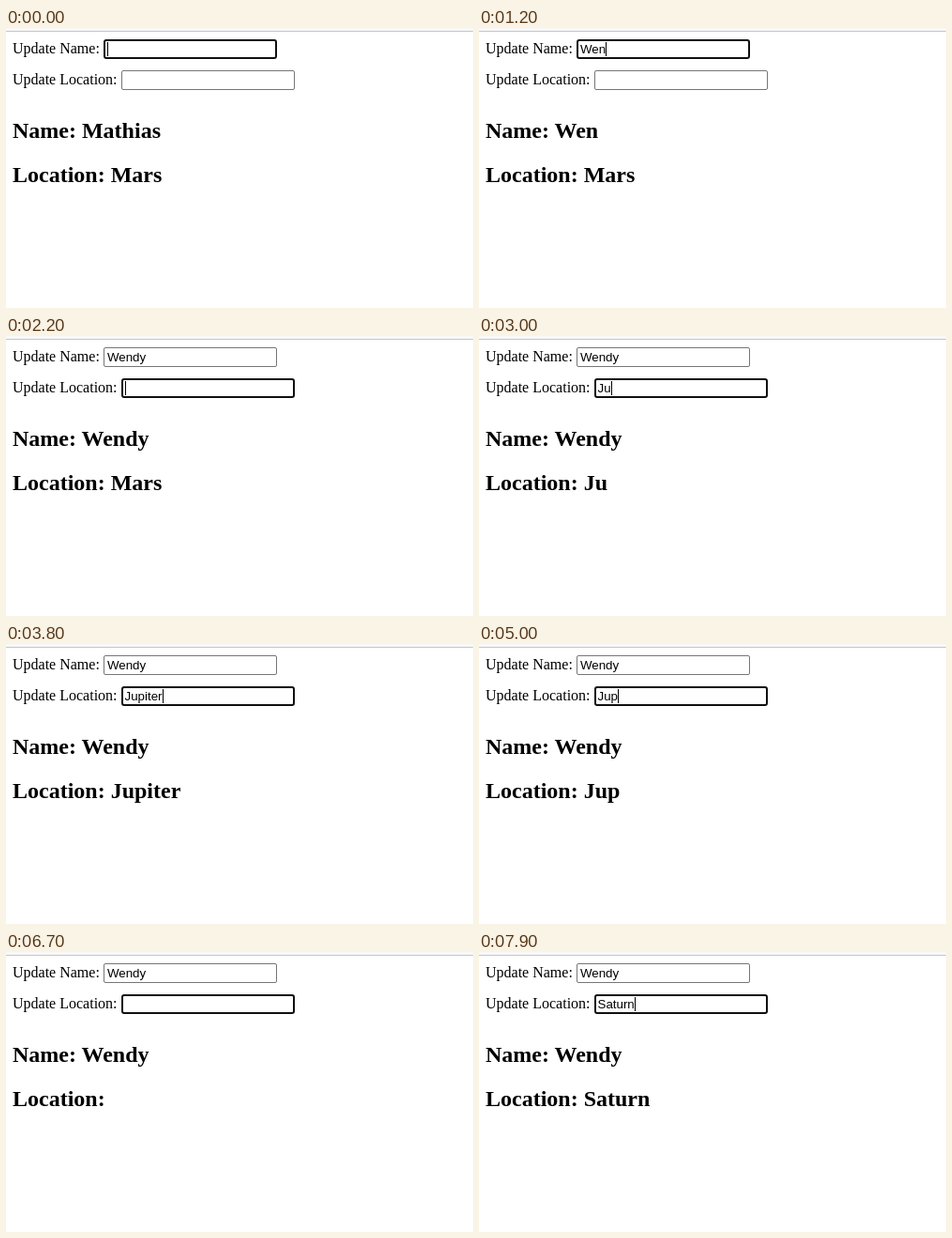
Recreate the animation shown at these times as an HTML page. Size 498 by 298 pixels, loop 8 s.

```html
<!DOCTYPE html>
<html lang="en">
<head>
<meta charset="utf-8">
<title>Update form</title>
<style>
  html, body { margin: 0; width: 100%; height: 100%; overflow: hidden; background: #fff; }
  svg { display: block; }
  .label { font: 16px "Liberation Serif", "Times New Roman", serif; }
  .head { font: bold 24px "Liberation Serif", "Times New Roman", serif; }
  .value { font: 13.3333px "Liberation Sans", Arial, sans-serif; }
  .box { fill: #fff; stroke: #767676; stroke-width: 1; }
  .box.focus { stroke: #101010; stroke-width: 2; }
</style>
</head>
<body>
<svg width="498" height="298" viewBox="0 0 498 298">
  <rect width="498" height="298" fill="#fff"/>
  <rect width="498" height="3" fill="#f8f8f8"/>
  <rect y="3" width="498" height="1" fill="#c6c6c6"/>
  <text class="label" x="7" y="27">Update Name:</text>
  <text class="label" x="7" y="60">Update Location:</text>
  <rect id="nameBox" class="box"/>
  <rect id="placeBox" class="box"/>
  <text id="nameValue" class="value" x="107.9" y="27"></text>
  <text id="placeValue" class="value" x="126.5" y="60"></text>
  <rect id="caret" width="1" height="15"/>
  <text id="nameHead" class="head" x="7" y="117"></text>
  <text id="placeHead" class="head" x="7" y="164"></text>
</svg>
<script>
const LOOP = 8000;
const FOCUS_MOVE = 2200;
const get = id => document.getElementById(id);

const makeField = (id, x, y, textX) => ({
  x, y, textX,
  box: get(id + "Box"),
  value: get(id + "Value"),
  head: get(id + "Head")
});
const nameField = makeField("name", 104, 12, 107.9);
const placeField = makeField("place", 123, 45, 126.5);
const caret = get("caret");

// One key press per time; count is the number of letters left after it.
const press = (word, times, from = 0, step = 1) =>
  times.map((at, i) => ({ at, text: word.slice(0, from + step * (i + 1)) }));

const nameKeys = press("Wendy", [1000, 1100, 1200, 1300, 1700]);
const placeKeys = [
  ...press("Jupiter", [2900, 3000, 3300, 3500, 3600, 3700, 3800]),
  ...press("Jupiter", [4500, 4600, 4800, 5000, 5100, 5200, 5500], 7, -1),
  ...press("Saturn", [7300, 7500, 7600, 7700, 7800, 7900])
];

// Spans in which the blinking caret is hidden.
const hidden = [[200, 800], [2800, 2900], [4300, 4500], [5600, 6100], [6700, 7300]];

function lastText(keys, t) {
  let text = null;
  for (const key of keys) if (key.at <= t) text = key.text;
  return text;
}

function setText(node, text) {
  if (node.textContent !== text) node.textContent = text;
}

function setAttrs(node, attrs) {
  for (const name in attrs) node.setAttribute(name, attrs[name]);
}

function drawField(field, label, initial, text, focused) {
  const inset = focused ? 1 : 0.5;
  setAttrs(field.box, {
    class: focused ? "box focus" : "box",
    x: field.x + inset,
    y: field.y + inset,
    width: 185 - 2 * inset,
    height: 21 - 2 * inset,
    rx: focused ? 2 : 1.5
  });
  setText(field.value, text ?? "");
  setText(field.head, label + ": " + (text ?? initial));
}

function draw(t) {
  const onName = t < FOCUS_MOVE;
  drawField(nameField, "Name", "Mathias", lastText(nameKeys, t), onName);
  drawField(placeField, "Location", "Mars", lastText(placeKeys, t), !onName);

  const active = onName ? nameField : placeField;
  const typed = active.value.textContent ? active.value.getComputedTextLength() : 0;
  const off = hidden.some(([from, to]) => t >= from && t < to);
  setAttrs(caret, {
    x: Math.round(active.textX + typed),
    y: active.y + 3,
    visibility: off ? "hidden" : "visible"
  });
}

const start = performance.now();
function tick() {
  draw((performance.now() - start) % LOOP);
  requestAnimationFrame(tick);
}
tick();
</script>
</body>
</html>
```
